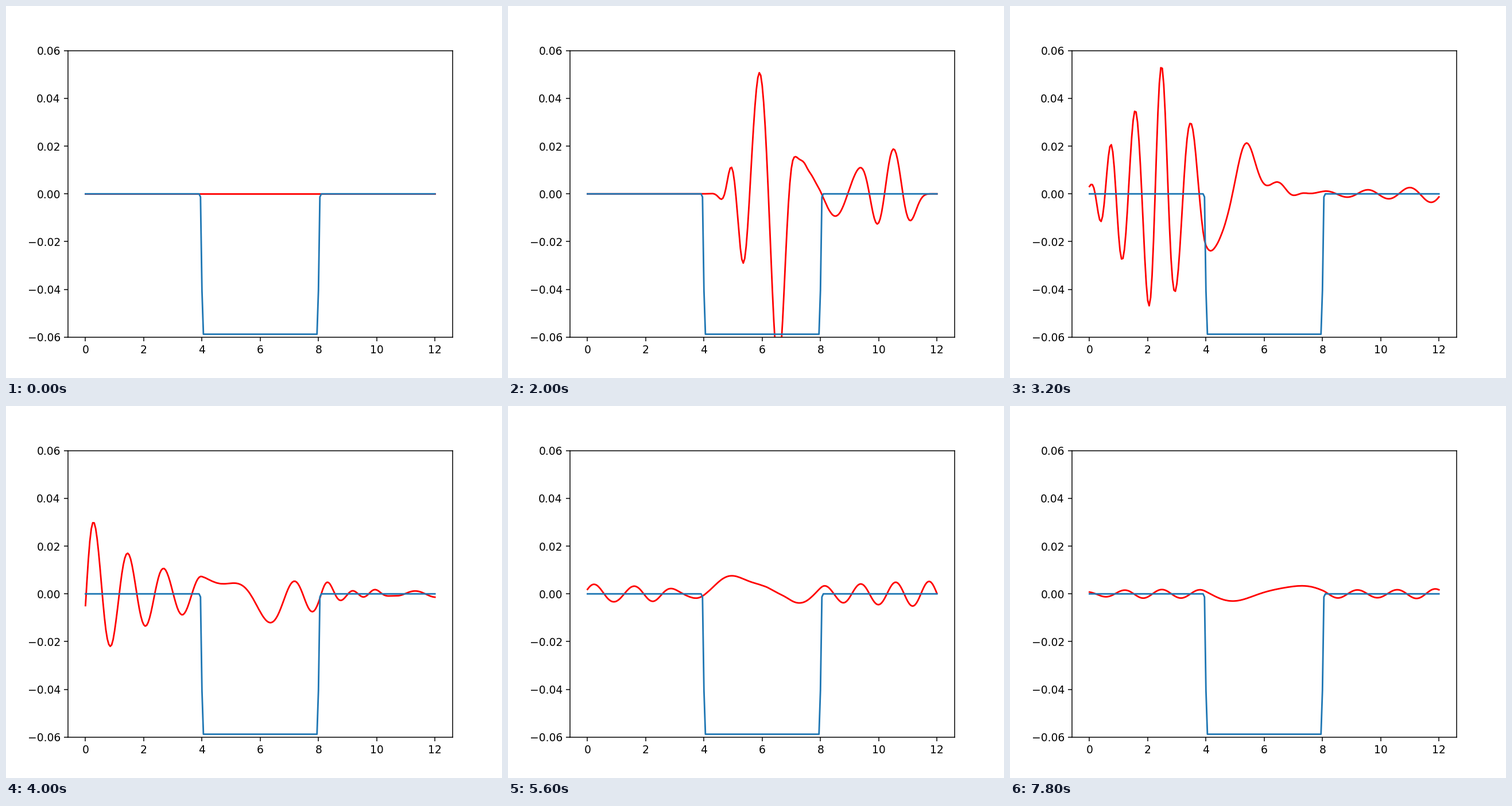
Animation of 864x648 px, one loop 8 s. Source, as a matplotlib script:

```python
"""A short laser pulse crossing an underdense plasma slab (1D FDTD).

Lengths are in wavelengths and times in wave periods, so c = 1.
"""
import numpy as np
import matplotlib.pyplot as plt
from matplotlib.animation import FuncAnimation

FRAMES, INTERVAL = 40, 200
LENGTH, DX = 12.0, 0.05
DT = DX / 2
STEPS = 32                        # time steps per frame
AMP = 0.061
DENSITY = 0.5                     # in critical densities
LEFT, RIGHT = 3.9895, 8.0105      # slab faces
LAG = 0.01

x = np.linspace(0, LENGTH, round(LENGTH / DX) + 1)


def smooth_step(u):
    """Step seen through linear particle weighting."""
    u = np.clip(u, -1, 1)
    return np.where(u < 0, (1 + u) ** 2 / 2, 1 - (1 - u) ** 2 / 2)


slab = smooth_step((x - LEFT) / DX) * smooth_step((RIGHT - x) / DX)


def pulse(t):
    """One period of rise, one of plateau, one of fall."""
    t -= LAG
    if not 0 < t < 3:
        return 0.0
    ramp = min(t, 1.0, 3 - t)
    return -AMP * np.sin(np.pi / 2 * ramp) ** 2 * np.cos(2 * np.pi * t)


def simulate():
    courant = DT / DX
    mur = (courant - 1) / (courant + 1)
    wp2 = DENSITY * (2 * np.pi) ** 2 * slab
    e = np.zeros_like(x)
    b = np.zeros(len(x) - 1)
    j = np.zeros_like(x)
    shots = [e.copy()]
    for n in range(1, (FRAMES - 1) * STEPS + 1):
        t = n * DT
        old = e.copy()
        b += courant * np.diff(e)
        j += DT * wp2 * e
        e[1:-1] += courant * np.diff(b) - DT * j[1:-1]
        # open ends; the pulse enters on the right
        e[0] = old[1] + mur * (e[1] - old[0])
        out_edge = old[-1] - pulse(t - DT)
        out_old = old[-2] - pulse(t - DT - DX)
        out_new = e[-2] - pulse(t - DX)
        e[-1] = pulse(t) + out_old + mur * (out_new - out_edge)
        if n % STEPS == 0:
            shots.append(e.copy())
    return shots


fields = simulate()

fig, ax = plt.subplots(figsize=(6.4, 4.8), dpi=135)
wave, = ax.plot(x, fields[0], color="red")
ax.plot(x, -0.0588 * slab, color="tab:blue")
ax.set_xlim(-0.6, 12.6)
ax.set_ylim(-0.06, 0.06)


def update(i):
    wave.set_ydata(fields[i])
    return wave,


anim = FuncAnimation(fig, update, frames=FRAMES, interval=INTERVAL,
                     repeat=True, repeat_delay=0)
plt.show()
```
